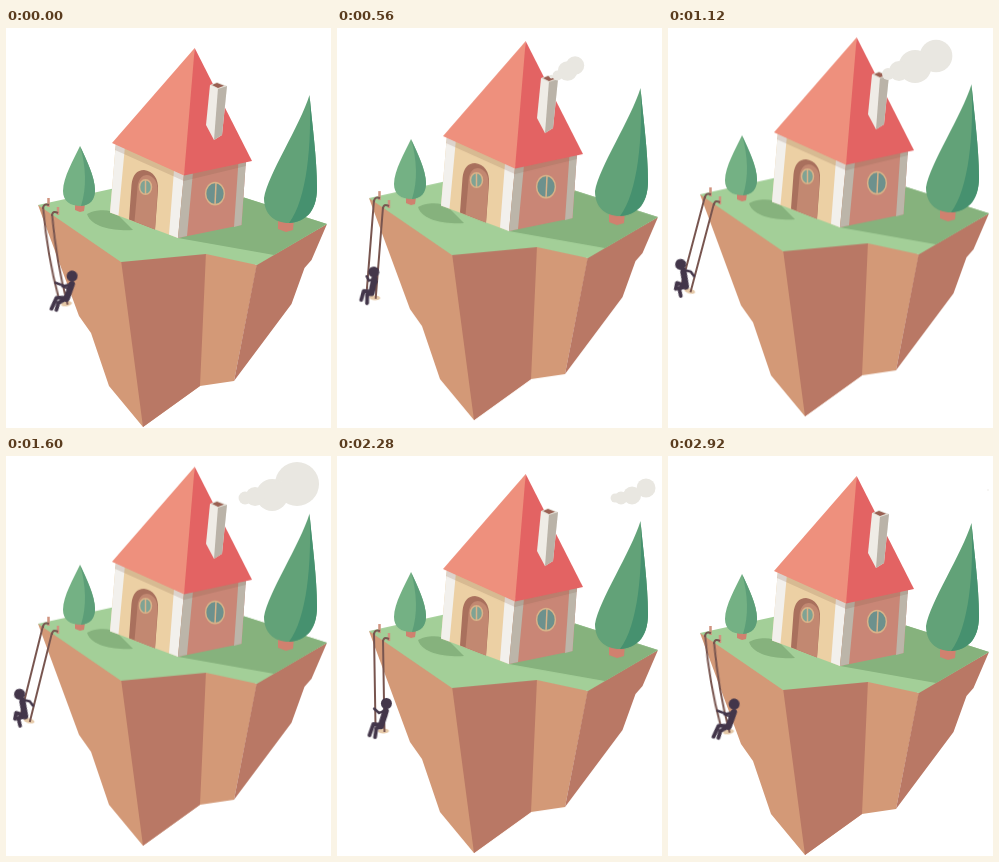
These frames come from a looping animation (325 by 400 pixels, 2960 ms). An HTML page:

```html
<!DOCTYPE html>
<html lang="en">
<head>
<meta charset="utf-8">
<title>Floating island</title>
<style>
html, body { margin: 0; width: 100%; height: 100%; overflow: hidden; background: #fff; }
svg { display: block; width: 325px; height: 400px; }

.bob, .swing, .slack, .torso, .head, .legs, .arms, .smoke circle {
  animation: 2960ms linear infinite;
}
.bob { animation-name: bob; }
.swing { animation-name: swing; }
.slack { animation-name: slack; fill: none; stroke: #78554f; stroke-width: 2; }
.far { transform-origin: 37px 179px; }
.near { transform-origin: 46px 186px; }

.rider path { fill: none; stroke: #43364a; stroke-linecap: round; stroke-linejoin: round; }
.rider .torso { animation-name: torso; stroke-width: 6.4; }
.rider .head { animation-name: head; stroke-width: 11; }
.rider .legs { animation-name: legs; stroke-width: 3.8; }
.rider .arms { animation-name: arms; stroke-width: 2.4; }

.smoke { fill: #e9e7e1; }
.smoke .puff1 { animation-name: puff1; }
.smoke .puff2 { animation-name: puff2; }
.smoke .puff3 { animation-name: puff3; }
.smoke .puff4 { animation-name: puff4; }

@keyframes bob {
  0%, 98.65%, 100% { transform: translateY(0); }
  10.81% { transform: translateY(-4px); }
  18.92% { transform: translateY(-6.9px); }
  27.03% { transform: translateY(-9px); animation-timing-function: ease-out; }
  39.5% { transform: translateY(-10.7px); animation-timing-function: ease-in; }
  54.05% { transform: translateY(-9.3px); }
  77.03% { transform: translateY(-2px); animation-timing-function: ease-out; }
}
@keyframes swing {
  0%, 98.65%, 100% { transform: rotate(-9.8deg); }
  10.81% { transform: rotate(-.9deg); }
  27.03% { transform: rotate(10deg); }
  37.84% { transform: rotate(14.8deg); animation-timing-function: ease-out; }
  45.95% { transform: rotate(16.2deg); animation-timing-function: ease-in; }
  54.05% { transform: rotate(14deg); }
  77.03% { transform: rotate(-.9deg); animation-timing-function: ease-out; }
}
@keyframes slack {
  0%, 98.65%, 100% { d: path("M0 0Q-4 50 0 92"); }
  10.81%, 77.03% { d: path("M0 0Q0 50 0 92"); }
}
@keyframes torso {
  0%, 98.65%, 100% { d: path("M8.6 -18.5L1 -5"); }
  10.81%, 77.03% { d: path("M2.5 -20L-2.5 -5"); }
  27.03% { d: path("M-6.1 -17L-4.8 -4.5"); }
  37.84%, 54.05% { d: path("M-11 -17L-5 -3.5"); }
}
@keyframes head {
  0%, 98.65%, 100% { d: path("M10.3 -26.4h.01"); }
  10.81%, 77.03% { d: path("M3.4 -27.5h.01"); }
  27.03% { d: path("M-9.3 -23.7h.01"); }
  37.84%, 54.05% { d: path("M-15.6 -23.5h.01"); }
}
@keyframes legs {
  0%, 98.65%, 100% { d: path("M1 -6L-8.8 -7.6L-15.6 2.3M1 -5L-7.7 -2.4L-10.9 4.2"); }
  10.81%, 77.03% { d: path("M-2 -6L-10 -7L-14 4M-2 -4L-7 -3L-8.5 6"); }
  27.03% { d: path("M-4.8 -5L-13 -4.8L-12.6 2.5M-4.8 -3L-8.6 -2L-5.9 6"); }
  37.84%, 54.05% { d: path("M-5 -4L-14.5 -4.5L-14 1.5M-5 -3L-11 0L-7.5 7"); }
}
@keyframes arms {
  0%, 98.65%, 100% { d: path("M8.6 -18.7L1 -18L-7.2 -22.6M8.6 -18L4 -15L-1 -18"); }
  10.81%, 77.03% { d: path("M2.5 -21L-4 -18L-9 -22.5M2.5 -20L3 -15L1 -17"); }
  27.03% { d: path("M-6.1 -17L-10 -15L-10.5 -19M-6.1 -18L-3 -14L.3 -15.3"); }
  37.84%, 54.05% { d: path("M-11 -18L-12 -15L-10.9 -20M-11 -19L-4 -19L.3 -15.5"); }
}
@keyframes puff1 {
  0%, 3% { cx: 212px; cy: 54px; r: 0; }
  10.81% { cx: 225px; cy: 45px; r: 7.5px; }
  27.03% { cx: 251px; cy: 30px; r: 10.8px; }
  37.84% { cx: 268px; cy: 28px; r: 16.3px; }
  54.05% { cx: 291px; cy: 28px; r: 22px; }
  77.03% { cx: 309px; cy: 32px; r: 9.5px; }
  98.65% { cx: 320px; cy: 34px; r: .7px; }
  100% { cx: 320px; cy: 34px; r: 0; }
}
@keyframes puff2 {
  0%, 4% { cx: 212px; cy: 54px; r: 0; }
  10.81% { cx: 220px; cy: 48px; r: 5.5px; }
  27.03% { cx: 241px; cy: 38px; r: 14px; }
  37.84% { cx: 247px; cy: 38.5px; r: 16.5px; }
  54.05% { cx: 266px; cy: 39px; r: 16px; }
  77.03% { cx: 295px; cy: 39.5px; r: 9px; }
  96%, 100% { cx: 319px; cy: 35px; r: 0; }
}
@keyframes puff3 {
  0%, 7% { cx: 212px; cy: 52px; r: 0; }
  10.81% { cx: 215px; cy: 51px; r: 2px; }
  27.03% { cx: 226px; cy: 44px; r: 8px; }
  37.84% { cx: 231px; cy: 43px; r: 10px; }
  54.05% { cx: 249px; cy: 40.5px; r: 9.5px; }
  77.03% { cx: 284px; cy: 42px; r: 6.5px; }
  94%, 100% { cx: 317px; cy: 36px; r: 0; }
}
@keyframes puff4 {
  0%, 12% { cx: 212px; cy: 50px; r: 0; }
  27.03% { cx: 217px; cy: 47px; r: 4px; }
  37.84% { cx: 220px; cy: 46px; r: 6px; }
  54.05% { cx: 239px; cy: 42px; r: 6.5px; }
  77.03% { cx: 278px; cy: 42px; r: 4.5px; }
  92%, 100% { cx: 314px; cy: 37px; r: 0; }
}
</style>
</head>
<body>
<svg viewBox="0 0 325 400">
  <g class="bob">
    <!-- Island: light cliff below, dark faces over it -->
    <path fill="#d39977" d="M32 177L200 215L251 237L228 353L194 358L137 399L103 358L85 305L73 288Z"/>
    <path fill="#b97865" d="M115 232L200 224L194 358L137 399ZM251 235L321 196L305.5 232L298.5 240L285.5 276L228 353Z"/>
    <path fill="#a3cf98" d="M32 177L130 155.5L238 169.5L321 196L251 237L200 226L115 234Z"/>
    <path fill="#86b27d" d="M172 210L268 227L321 196L238 169.5L225 190Z"/>

    <!-- Left tree -->
    <path fill="#86b27d" d="M81 186C88 182 104 180 112 187L127 202C112 203 86 201 81 186Z"/>
    <path fill="#d0816f" d="M69 176H79L78 183L74 184L69 182Z"/>
    <path fill="#74b184" d="M74 118C68 131 57 149 57 163C57 173 64 178 75 178C84 177 89 172 89 162C89 149 80 131 74 118Z"/>
    <path fill="#5c9e78" d="M74 118C80 131 89 149 89 162C89 172 84 177 75 178C81 160 80 138 74 118Z"/>

    <!-- Walls -->
    <path fill="#ecd0a4" d="M110 114L178 146L172 210L104 184.5Z"/>
    <path fill="#f2f0ec" d="M110 114L119 118L112.5 187.5L104 184.5ZM168 142L178 146L172 210L163 206.5Z"/>
    <path fill="#c98676" d="M178 146L240 131L235.5 197L172 210Z"/>
    <path fill="#bcb5a9" d="M178 146L187 144L181 208L172 210ZM232.5 133L240 131L235.5 197L228 199Z"/>
    <path fill="#80604a" fill-opacity=".2" d="M110 114L178 146L240 131V138L178 153L109 122Z"/>

    <!-- Door and windows -->
    <path fill="#a9705d" d="M123 191.5L125.5 157C126.5 147 131 142 138 142C147 143 153 151 152 162L149 201.5Z"/>
    <path fill="#c28871" d="M128.5 193.5L131.5 160C132 151 136 147 141 147C148 148 152 154 151.5 163L149 201.5Z"/>
    <g stroke="#d9b389" stroke-width="1.5">
      <ellipse cx="139.5" cy="159" rx="6" ry="7.3" fill="#7fa394"/>
      <path d="M139.5 152V166"/>
      <ellipse cx="209" cy="165.7" rx="9.4" ry="11.1" fill="#6d918d"/>
      <path d="M210 155L209 177"/>
    </g>

    <!-- Roof and chimney -->
    <path fill="#ee907d" d="M188.7 20L106 115L178 147.5L190 100Z"/>
    <path fill="#e36363" d="M188.7 20L178 147.5L246 133Z"/>
    <path fill="#efece6" d="M204 57L221 58L216 107L208 112L200 97Z"/>
    <path fill="#bab3a8" d="M212 60L221 58L216 107L208 112Z"/>
    <path fill="#e2ddd4" d="M204 57L211 54L221 58L212 61Z"/>
    <path fill="#985f52" d="M206 57L211 55L218 57.7L212 60Z"/>

    <!-- Right tree -->
    <path fill="#d0816f" d="M272 191H288L287 202L280 204L272 201Z"/>
    <path fill="#62a278" d="M303.5 67C294 98 262 146 258 170C258 186 268 195 283 195C299 194 311 184 311 160C311 130 306 95 303.5 67Z"/>
    <path fill="#46916f" d="M303.5 67C306 95 311 130 311 160C311 184 299 194 283 195C301 172 306 115 303.5 67Z"/>

    <!-- Swing -->
    <g fill="none" stroke="#d0937f" stroke-width="2.5">
      <path d="M42.5 170V179M52 179V187"/>
      <path stroke="#78554f" stroke-width="2" d="M43 177Q37 175 37 181M52 185Q46 182 46 188"/>
    </g>
    <g class="swing far"><path class="slack" transform="translate(37 179)" d="M0 0V92"/></g>
    <g class="swing near">
      <ellipse cx="45" cy="277" rx="5.5" ry="2.6" fill="#e5c9a8"/>
      <path class="slack" transform="translate(46 186)" d="M0 0V92"/>
      <g class="rider" transform="translate(45 277)">
        <path class="arms"/>
        <path class="legs"/>
        <path class="torso"/>
        <path class="head"/>
      </g>
    </g>
  </g>

  <g class="smoke">
    <circle class="puff1"/>
    <circle class="puff2"/>
    <circle class="puff3"/>
    <circle class="puff4"/>
  </g>
</svg>
</body>
</html>
```
